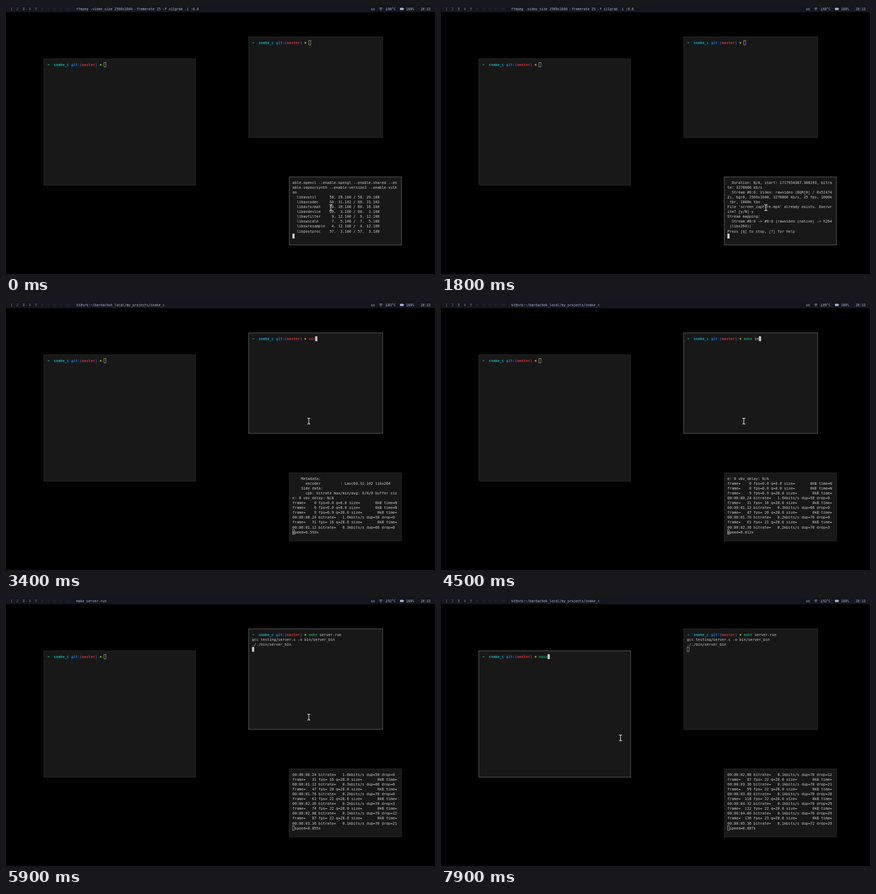
These frames come from a looping animation (800x500 px, 8 s). An HTML page:

```html
<!DOCTYPE html>
<html lang="en">
<head>
<meta charset="utf-8">
<title>Terminal session</title>
<style>
  html, body { margin: 0; width: 100%; height: 100%; overflow: hidden; background: #000; }
  /* The desktop is laid out at 2560x1600 and scaled to the 800x500 stage. */
  #desk {
    position: absolute; left: 0; top: 0; width: 2560px; height: 1600px;
    transform: scale(.3125); transform-origin: 0 0; overflow: hidden; background: #000;
    font: 21.6px/29px "DejaVu Sans Mono", monospace; color: #ccc;
    white-space: pre; font-variant-ligatures: none;
  }
  #bar {
    position: absolute; inset: 0 0 auto 0; height: 37px; background: #16161e;
    font-size: 19.93px; line-height: 36px; color: #a9b1d6;
  }
  #bar > * { position: absolute; top: 0; }
  #spaces { left: 26px; display: flex; gap: 24.7px; color: #6f7591; }
  #spaces .now { color: #a9b1d6; }
  #spaces .empty { color: #2b2e40; }
  .win { position: absolute; box-sizing: border-box; background: #181818; border: 3px solid #282828; }
  .win.focus { border-color: #606060; }
  .text, .caret { position: absolute; }
  .caret { width: 13px; height: 29px; box-sizing: border-box; border: 2.5px solid #ccc; color: transparent; }
  .focus .caret { background: #ccc; color: #181818; border: 0; }
  .cell { display: inline-block; width: 13px; height: 29px; vertical-align: top; }
  b { font-weight: bold; }
  svg { overflow: visible; }
  #pointer { position: absolute; left: 0; top: 0; }
</style>
</head>
<body>
<div id="desk">
  <div id="bar">
    <div id="spaces"></div>
    <span id="title" style="left:419px"></span>
    <span style="left:2178px">us</span>
    <svg width="2560" height="37" fill="none" stroke="#a9b1d6" stroke-width="2.5" style="left:0">
      <path d="M2227 14q10 -8 20 0M2231 18.500q6 -5 12 0"/>
      <circle cx="2237" cy="23" r="1.6"/>
      <path d="M2271 10v11"/>
      <circle cx="2271" cy="24" r="2.500"/>
      <rect x="2352" y="12" width="19" height="11" rx="2" fill="#a9b1d6"/>
      <path d="M2374 15v5"/>
    </svg>
    <span id="temp" style="left:2278px"></span>
    <span style="left:2387px">100%</span>
    <span style="left:2474px">20:33</span>
  </div>
  <svg id="pointer" width="1" height="1" fill="none">
    <g id="beam">
      <path d="M-9 -17h6l3 3l3 -3h6M0 -14v28M-9 17h6l3 -3l3 3h6" stroke="#000" stroke-width="9"/>
      <path d="M-9 -17h6l3 3l3 -3h6M0 -14v28M-9 17h6l3 -3l3 3h6" stroke="#eee" stroke-width="4"/>
    </g>
    <g id="cross">
      <path d="M-7 -7L7 7M7 -7L-7 7" stroke="#ddd" stroke-width="9" stroke-linecap="square"/>
      <path d="M-7 -7L7 7M7 -7L-7 7" stroke="#000" stroke-width="5" stroke-linecap="square"/>
    </g>
  </svg>
</div>
<script>
const LOOP = 8000, STEP = 100, COLS = 48, ROWS = 12;
const $ = id => document.getElementById(id);
const GREEN = '#0dbc79', CYAN = '#11a8b8', BLUE = '#2472c8', RED = '#cd3131', YELLOW = '#e5e510';

// Last table entry whose time has come.
const latest = (table, t) => table.filter(row => row[0] <= t).pop();
const wrap = s => s.match(new RegExp(`.{1,${COLS}}`, 'g'));

function span(text, color, tag = 'span', cls = '') {
  const el = document.createElement(tag);
  el.textContent = text;
  el.className = cls;
  if (color) el.style.color = color;
  return el;
}

function makeWindow(x, y, w, h, textX, textY) {
  const el = span('', '', 'div', 'win');
  const text = span('', '', 'div', 'text'), caret = span('', '', 'div', 'caret');
  Object.assign(el.style, { left: x + 'px', top: y + 'px', width: w + 'px', height: h + 'px' });
  const dx = textX - x - 3, dy = textY - y - 3;
  Object.assign(text.style, { left: dx + 'px', top: dy + 'px' });
  el.append(text, caret);
  $('desk').insertBefore(el, $('pointer'));
  return {
    el, text,
    contains: (px, py) => px >= x && px < x + w && py >= y && py < y + h,
    caretAt(col, row, char = '') {
      caret.style.left = dx + col * 13 + 'px';
      caret.style.top = dy + row * 29 + 'px';
      caret.textContent = char;
    }
  };
}

const client = makeWindow(224, 314, 909, 757, 246, 336);
const server = makeWindow(1447, 183, 802, 603, 1468, 205);
const recorder = makeWindow(1689, 1019, 672, 409, 1709, 1040);
const windows = [client, server, recorder];

for (let n = 1; n <= 10; n++) {
  $('spaces').append(span(n, '', 'span', n === 3 ? 'now' : n > 5 ? 'empty' : ''));
}

function drawShell(win, typed, output = null) {
  const command = typed.slice(0, 4);
  win.text.replaceChildren(
    span('➜', GREEN, 'b', 'cell'), '  ', span('snake_c', CYAN, 'b'), ' ',
    span('git:(', BLUE, 'b'), span('master', RED, 'b'), span(')', BLUE, 'b'), ' ',
    span('×', YELLOW, 'b'), ' ',
    span(command, command === 'make' ? GREEN : RED), typed.slice(4),
    output ? '\n' + output.join('\n') : '');
  if (output) win.caretAt(0, output.length + 1);
  else win.caretAt(26 + typed.length, 0);
}

const version = (name, a, b, c) => {
  const v = `${String(a).padStart(2)}.${String(b).padStart(3)}.${c}`;
  return `  ${name.padEnd(14)} ${v} / ${v}`;
};

const CONFIG = [
  'able-opencl --enable-opengl --enable-shared --en',
  'able-vapoursynth --enable-version3 --enable-vulk',
  'an',
  version('libavutil', 58, 29, 100),
  version('libavcodec', 60, 31, 102),
  version('libavformat', 60, 16, 100),
  version('libavdevice', 60, 3, 100),
  version('libavfilter', 9, 12, 100),
  version('libswscale', 7, 5, 100),
  version('libswresample', 4, 12, 100),
  version('libpostproc', 57, 3, 100),
  ''
];
const INPUT = [
  "  Duration: N/A, start: 1717954387.308193, bitrate: 3276800 kb/s",
  '  Stream #0:0: Video: rawvideo (BGR[0] / 0x524742), bgr0, 2560x1600, 3276800 kb/s, 25 fps, 1000k tbr, 1000k tbn',
  "File 'screen_capture.mp4' already exists. Overwrite? [y/N] y",
  'Stream mapping:',
  '  Stream #0:0 -> #0:0 (rawvideo (native) -> h264 (libx264))',
  'Press [q] to stop, [?] for help'
].flatMap(wrap).concat('');
const OUTPUT = [
  "Output #0, mp4, to 'screen_capture.mp4':",
  '  Metadata:',
  '    encoder         : Lavf60.16.100',
  '  Stream #0:0: Video: h264 (avc1 / 0x31637661),',
  'yuv444p(tv, progressive), 2560x1600, q=2-31, 25',
  'fps, 12800 tbn',
  '    Metadata:',
  '      encoder         : Lavc60.31.102 libx264',
  '    Side data:',
  '      cpb: bitrate max/min/avg: 0/0/0 buffer size: 0 vbv_delay: N/A'
].flatMap(wrap).concat('');

// time, frame, fps, seconds encoded, kbit/s, dup, drop, speed
const PROGRESS = [
  [1900, 0, '0.0', null, 0, 21, 0],
  [2400, 0, '0.0', null, 0, 42, 0],
  [2900, 9, '6.9', '0.24', 1.6, 50, 0, .185],
  [3400, 31, '16', '1.12', .3, 66, 0, .593],
  [3900, 47, '20', '1.76', .2, 70, 0, .746],
  [4400, 61, '21', '2.36', .2, 70, 3, .812],
  [4900, 74, '22', '2.88', .1, 70, 12, .846],
  [5400, 87, '22', '3.36', .1, 70, 21, .855],
  [6000, 99, '22', '3.88', .1, 70, 28, .864],
  [6400, 110, '22', '4.32', .1, 70, 29, .866],
  [6900, 122, '22', '4.80', .1, 70, 29, .874],
  [7400, 136, '23', '5.36', .1, 72, 29, .887]
];

function statusLine([, frame, fps, clock, rate, dup, drop, speed]) {
  const started = clock !== null;
  return `frame=${String(frame).padStart(5)} fps=${fps.padStart(3)} q=${started ? '28.0' : '0.0'} ` +
    `size=       0kB time=${started ? '00:00:0' + clock : 'N/A'} ` +
    `bitrate=${started ? rate.toFixed(1).padStart(6) + 'kbits/s' : 'N/A'} ` +
    `dup=${dup} drop=${drop} speed=${started ? speed.toFixed(3) + 'x' : 'N/A'}`;
}

function drawRecorder(t) {
  const updates = PROGRESS.filter(row => row[0] <= t);
  let lines = t < 1500 ? CONFIG : updates.length ? [...OUTPUT] : INPUT;
  // Each update returns to the start of the last row and writes over it.
  for (const row of updates) lines.splice(-1, 1, ...wrap(statusLine(row)));
  lines = lines.slice(-ROWS);
  recorder.text.textContent = lines.join('\n');
  recorder.caretAt(0, lines.length - 1, lines[lines.length - 1][0]);
}

const COMMAND = 'make server-run';
const SERVER_KEYS = [3200, 3300, 3400, 3600, 3900, 4300, 4500, 4600, 4700, 4800, 4900, 5000, 5200, 5300, 5400];
const CLIENT_KEYS = [7300, 7600, 7700, 7800];
const SERVER_START = 5600;
const SERVER_OUTPUT = ['gcc testing/server.c -o bin/server_bin', '././bin/server_bin'];
const typed = (keys, t) => COMMAND.slice(0, keys.filter(k => k <= t).length);

const SHELL_TITLE = 'kt@orb:~/bardachok_local/my_projects/snake_c';
const TITLES = [
  [0, 'ffmpeg -video_size 2560x1600 -framerate 25 -f x11grab -i :0.0'],
  [2700, SHELL_TITLE], [SERVER_START, COMMAND], [6700, SHELL_TITLE]
];
const FOCUS = [[0, recorder], [2700, server], [6700, client]];
const TEMPS = [[0, 60], [1900, 70], [2400, 76], [2900, 80], [3400, 83], [3900, 87], [4400, 89], [4900, 91], [5400, 92]];
const PATH = [
  [0, 1939, 1204], [1900, 1939, 1204], [2400, 1887, 930], [2500, 1887, 930],
  [2900, 1807, 711], [6200, 1807, 711], [6900, 1071, 835], [LOOP, 1071, 835]
];

function pointerAt(t) {
  const i = PATH.findIndex(p => p[0] > t);
  const [t0, x0, y0] = PATH[i - 1], [t1, x1, y1] = PATH[i];
  const u = (t - t0) / (t1 - t0), e = u * u * (3 - 2 * u);
  return [x0 + (x1 - x0) * e, y0 + (y1 - y0) * e];
}

function draw(t) {
  $('title').textContent = latest(TITLES, t)[1];
  $('temp').textContent = latest(TEMPS, t)[1] + '°C';
  const focused = latest(FOCUS, t)[1];
  for (const w of windows) w.el.classList.toggle('focus', w === focused);

  drawShell(client, typed(CLIENT_KEYS, t));
  drawShell(server, typed(SERVER_KEYS, t), t >= SERVER_START ? SERVER_OUTPUT : null);
  drawRecorder(t);

  const [x, y] = pointerAt(t);
  const overText = windows.some(w => w.contains(x, y));
  $('pointer').style.transform = `translate(${x}px, ${y}px)`;
  $('beam').style.display = overText ? '' : 'none';
  $('cross').style.display = overText ? 'none' : '';
}

const start = performance.now();
let shown = -1;
function tick() {
  const t = Math.floor((performance.now() - start) % LOOP / STEP) * STEP;
  if (t !== shown) draw(shown = t);
  requestAnimationFrame(tick);
}
tick();
</script>
</body>
</html>
```
